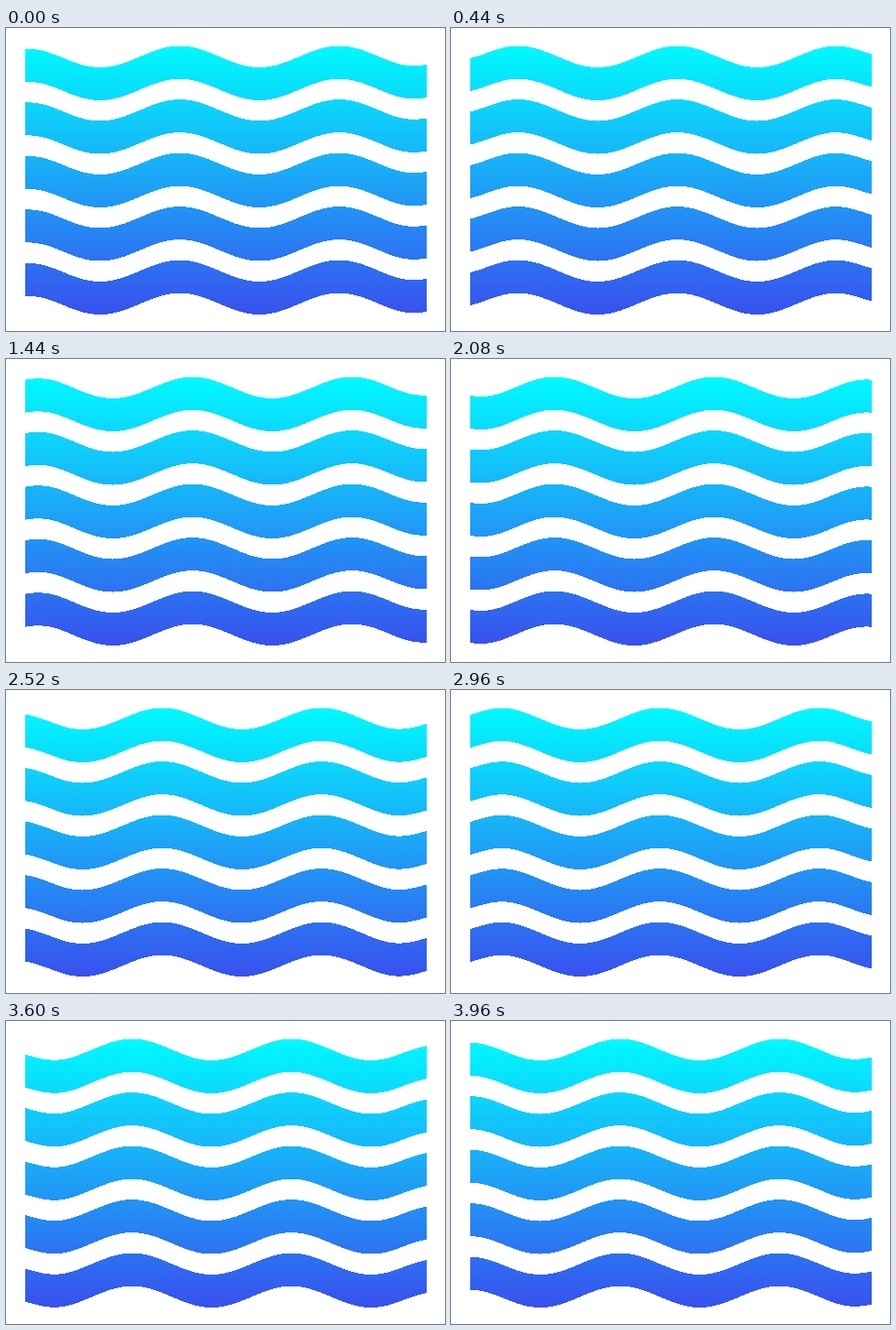
Write an HTML page that moves like this. It is 480x331 px and loops after 4 s.

```html
<!DOCTYPE html>
<html lang="en">
<head>
<meta charset="utf-8">
<title>Waves</title>
<style>
  html, body { margin: 0; width: 100%; height: 100%; overflow: hidden; background: #fff; }
  svg { display: block; width: 100%; height: 100%; }
</style>
</head>
<body>
<svg viewBox="0 0 480 331">
  <defs>
    <linearGradient id="sea" gradientUnits="userSpaceOnUse" x1="0" y1="19.5" x2="0" y2="313.3">
      <stop offset="0" stop-color="#00faff"/>
      <stop offset="1" stop-color="#3850ee"/>
    </linearGradient>
  </defs>
  <path id="waves" fill="url(#sea)" shape-rendering="crispEdges"/>
</svg>
<script>
const LOOP = 4000, STEP = 40, CYCLES = 3;
const LEFT = 21, RIGHT = 460, LENGTH = 174.3, CREST = 190;
const ROWS = 5, PITCH = 58.5, TOP = 31.3, THICK = 36, AMP = 11.7;
const FADE = 45;
const waves = document.getElementById('waves');

// Height of the swell; it calms down slightly towards both ends.
function swell(x, shift) {
  const edge = Math.min(x - LEFT, RIGHT - x);
  const calm = Math.max(0, 1 - edge / FADE) ** 2;
  const inward = x < (LEFT + RIGHT) / 2 ? 3.5 : -3.5;
  const phase = (x + inward * calm - CREST - shift) / LENGTH * 2 * Math.PI;
  return -AMP * (1 - 0.25 * calm) * Math.cos(phase);
}

function draw(time) {
  const shift = time / LOOP * CYCLES * LENGTH;
  const curve = [];
  for (let x = LEFT; x <= RIGHT; x++) curve.push([x, swell(x, shift)]);
  const back = [...curve].reverse();
  const line = (points, y) => points.map(([x, h]) => `${x} ${(y + h).toFixed(2)}`).join('L');

  let d = '';
  for (let row = 0; row < ROWS; row++) {
    const y = TOP + row * PITCH;
    d += `M${line(curve, y)}L${line(back, y + THICK)}Z`;
  }
  waves.setAttribute('d', d);
}

const start = performance.now();
function tick() {
  const time = (performance.now() - start) % LOOP;
  draw(Math.floor(time / STEP) * STEP);
  requestAnimationFrame(tick);
}
tick();
</script>
</body>
</html>
```
